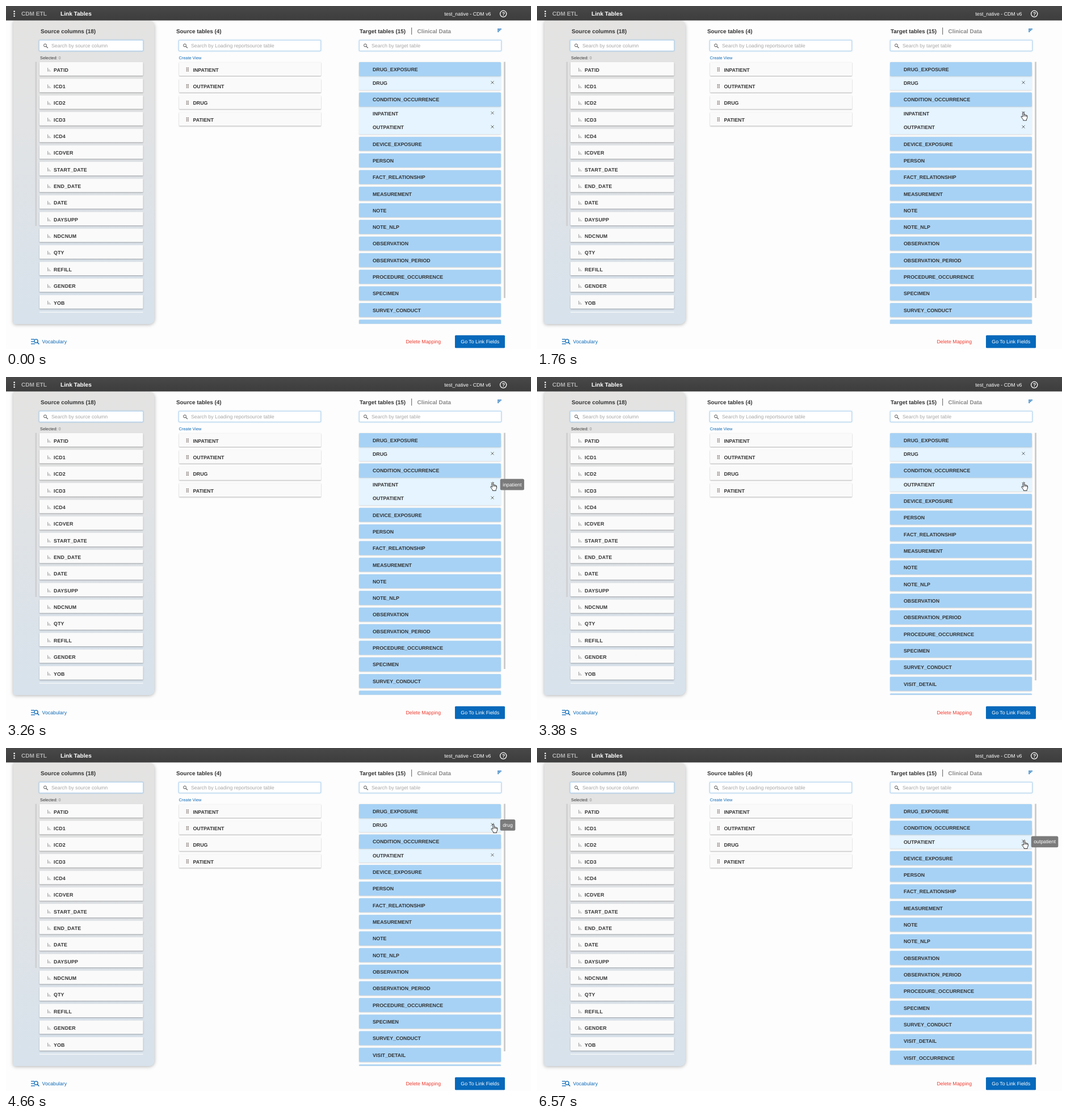
Recreate the animation shown at these times as an HTML page with a canvas. Size 925 px wide and 605 px high, loop 8 s.

```html
<!DOCTYPE html>
<html lang="en">
<head>
<meta charset="utf-8">
<title>Link Tables</title>
<style>
html, body { margin: 0; width: 100%; height: 100%; overflow: hidden; background: #fdfdfd; }
canvas { display: block; }
</style>
</head>
<body>
<canvas id="stage" width="925" height="605"></canvas>
<script>
const ctx = document.getElementById('stage').getContext('2d');
const LOOP = 8000, PITCH = 29.35, SUB = 24.4;
const FONT = '"Liberation Sans", Arial, sans-serif';
const BLUE = '#0b69b7', INK = '#333';

const COLUMNS = ['PATID', 'ICD1', 'ICD2', 'ICD3', 'ICD4', 'ICDVER', 'START_DATE', 'END_DATE',
  'DATE', 'DAYSUPP', 'NDCNUM', 'QTY', 'REFILL', 'GENDER', 'YOB'];
const TABLES = ['INPATIENT', 'OUTPATIENT', 'DRUG', 'PATIENT'];
const CDM = ['DRUG_EXPOSURE', 'CONDITION_OCCURRENCE', 'DEVICE_EXPOSURE', 'PERSON',
  'FACT_RELATIONSHIP', 'MEASUREMENT', 'NOTE', 'NOTE_NLP', 'OBSERVATION', 'OBSERVATION_PERIOD',
  'PROCEDURE_OCCURRENCE', 'SPECIMEN', 'SURVEY_CONDUCT', 'VISIT_DETAIL', 'VISIT_OCCURRENCE'];

const UNLINK_INPATIENT = 3380, UNLINK_DRUG = 5530;

// time, x, y of the pointer tip
const PATH = [
  [350, 918, 600], [600, 868, 540], [900, 828, 458], [1020, 820, 350], [1140, 841, 222],
  [1320, 852, 202], [1560, 857, 188], [1900, 857, 186], [2020, 857, 187], [2200, 850, 208],
  [2380, 859.5, 190], [2630, 859, 187], [2710, 859, 187], [2770, 857.7, 185],
  [3680, 857.7, 185], [3820, 860, 193], [4000, 862.5, 184], [4220, 876, 157],
  [4480, 859, 134], [5920, 859, 134], [6200, 869, 147], [6440, 859, 163],
  [6570, 858.5, 162], [8000, 858.5, 162]
];

// start, end, label, middle line
const TIPS = [
  [1820, 2080, 'inpatient', 189.8], [3140, UNLINK_INPATIENT, 'inpatient', 189.8],
  [3430, 3740, 'outpatient', 189.8], [4530, UNLINK_DRUG, 'drug', 136],
  [6455, 9000, 'outpatient', 165.4]
];

const clamp = v => Math.max(0, Math.min(1, v));

function text(str, x, y, size, color, weight = 400, spacing = 0) {
  ctx.font = `${weight} ${size}px ${FONT}`;
  ctx.letterSpacing = spacing + 'px';
  ctx.fillStyle = color;
  ctx.fillText(str, x, y);
}

function rect(x, y, w, h, color) {
  ctx.fillStyle = color;
  ctx.fillRect(x, y, w, h);
}

function round(x, y, w, h, r, color) {
  ctx.fillStyle = color;
  ctx.beginPath();
  ctx.roundRect(x, y, w, h, r);
  ctx.fill();
}

function line(color, width, ...pts) {
  ctx.strokeStyle = color;
  ctx.lineWidth = width;
  ctx.beginPath();
  for (let i = 0; i < pts.length; i += 4) {
    ctx.moveTo(pts[i], pts[i + 1]);
    ctx.lineTo(pts[i + 2], pts[i + 3]);
  }
  ctx.stroke();
}

function ring(x, y, r, color, width) {
  ctx.strokeStyle = color;
  ctx.lineWidth = width;
  ctx.beginPath();
  ctx.arc(x, y, r, 0, Math.PI * 2);
  ctx.stroke();
}

function withShadow(color, blur, dy, draw) {
  ctx.save();
  ctx.shadowColor = color;
  ctx.shadowBlur = blur;
  ctx.shadowOffsetY = dy;
  draw();
  ctx.restore();
}

function searchBox(x, w, hint) {
  withShadow('rgba(70,150,220,.45)', 3, 0, () => round(x, 60, w, 19.5, 1.5, '#a6cdec'));
  round(x + .8, 60.8, w - 1.6, 17.9, 1, '#fff');
  ring(x + 11, 69.4, 2.5, '#555', 1);
  line('#555', 1.2, x + 12.9, 71.3, x + 15.8, 74.2);
  text(hint, x + 22, 73, 8.8, '#a5a5a5');
}

function card(x, y, w, h) {
  withShadow('rgba(0,0,0,.3)', 2, 1, () => round(x, y, w, h, 1, '#fafafa'));
}

function topBar() {
  const g = ctx.createLinearGradient(0, 0, 0, 25.5);
  g.addColorStop(0, '#484848');
  g.addColorStop(1, '#3d3d3d');
  rect(0, 0, 925, 25.5, g);
  for (const y of [9.6, 13.7, 17.8]) round(13.3, y - 1.3, 2.6, 2.6, 1.3, '#fff');
  text('CDM ETL', 27, 17.4, 10.1, '#b2b2b2', 700);
  text('Link Tables', 96, 17.4, 10.1, '#fff', 700);
  text('test_native - CDM v6', 772.3, 16.6, 8.8, '#fff');
  ring(876.2, 13.8, 5.6, '#fff', 1.3);
  text('?', 873.7, 17.2, 9, '#fff', 700);
}

function columnPanel() {
  const g = ctx.createLinearGradient(0, 26, 0, 561);
  g.addColorStop(0, '#e4e3e2');
  g.addColorStop(.3, '#e2e3e4');
  g.addColorStop(1, '#d7e2ec');
  withShadow('rgba(0,0,0,.3)', 6, 1, () => round(13, 26, 248.5, 535, [0, 10, 9, 4], g));
  text('Source columns (18)', 61, 47.5, 9.9, INK, 700);
  searchBox(58, 184, 'Search by source column');
  text('Selected:', 60, 93.7, 7.33, INK);
  text('0', 92.6, 93.7, 7.33, '#888');
  rect(51.5, 98.5, 2.7, 289.5, '#cfcfcf');
  COLUMNS.forEach((name, i) => {
    const y = 99 + PITCH * i;
    card(59, y, 182.5, 23.8);
    line('#999', 1, 73.6, y + 10, 73.6, y + 16.6, 75.8, y + 12.5, 75.8, y + 16.6,
      78, y + 14.8, 78, y + 16.6);
    text(name, 84, y + 16.6, 8.8, INK, 700, .2);
  });
  rect(59, 539.3, 182.5, 1.5, '#f6f8fa');
}

function tableList() {
  text('Source tables (4)', 300, 47.5, 9.9, INK, 700);
  searchBox(304, 251, 'Search by Loading reportsource table');
  text('Create View', 304.5, 93.7, 7.33, BLUE);
  TABLES.forEach((name, i) => {
    const y = 99.3 + PITCH * i;
    card(305, y, 250, 23.8);
    for (let k = 0; k < 6; k++)
      rect(317.7 + (k % 2) * 2.6, y + 9.3 + (k >> 1) * 2.6, 1.5, 1.5, '#6a5c58');
    text(name, 329.5, y + 16.3, 8.8, INK, 700);
  });
}

function linksOf(name, t) {
  if (name === CDM[0]) return t < UNLINK_DRUG ? ['DRUG'] : [];
  if (name === CDM[1]) return t < UNLINK_INPATIENT ? ['INPATIENT', 'OUTPATIENT'] : ['OUTPATIENT'];
  return [];
}

// Draws the right-hand list and returns the middle lines of the linked rows.
function cdmList(t) {
  text('Target tables (15)', 623, 47.5, 9.9, INK, 700);
  rect(714, 38, 1.2, 12.5, '#777');
  text('Clinical Data', 724.5, 47.5, 9.95, '#8a8a8a', 700);
  [7, 5, 2.6].forEach((w, i) => rect(866, 40 + i * 2.3, w, 1.3, BLUE));
  searchBox(622, 251, 'Search by target table');

  const linked = [];
  let y = 111.4;
  ctx.save();
  ctx.beginPath();
  ctx.rect(618, 95, 258, 465.5);
  ctx.clip();
  for (const name of CDM) {
    const links = linksOf(name, t);
    if (links.length)
      withShadow('rgba(0,0,0,.15)', 2, 1, () =>
        round(622, y, 250, 12.4 + SUB * links.length, 1.5, '#e5f4ff'));
    withShadow('rgba(0,0,0,.2)', 2, .7, () => round(622, y - 12.5, 250, 24.6, 1.5, '#a7d2f5'));
    text(name, 646, y + 3.3, 8.8, INK, 700);
    for (const link of links) {
      y += SUB;
      linked.push(y);
      text(link, 646, y + 3.4, 8.8, INK, 700);
      const m = y - .9, r = 2.5;
      line('#555', .9, 857 - r, m - r, 857 + r, m + r, 857 - r, m + r, 857 + r, m - r);
    }
    y += 29.32;
  }
  ctx.restore();
  const end = t < UNLINK_INPATIENT ? 515 : t < UNLINK_DRUG ? 535 : 558;
  rect(877, 98.5, 3, end - 98.5, '#cdcdcd');
  return linked;
}

function footer() {
  line(BLUE, 1.3, 44, 587.8, 50, 587.8, 44, 591.8, 49, 591.8, 44, 595.8, 51, 595.8);
  ring(53, 591, 3.1, BLUE, 1.3);
  line(BLUE, 1.5, 55.2, 593.2, 58.3, 596.5);
  text('Vocabulary', 63.5, 595.1, 8.8, BLUE);
  text('Delete Mapping', 704.5, 595.1, 8.8, '#f03a2e');
  round(791, 580.8, 88, 22.4, 1.5, '#0769bb');
  text('Go To Link Fields', 801.3, 595.1, 8.8, '#fff');
}

function tooltips(t) {
  for (const [from, to, label, mid] of TIPS) {
    if (t < from || t >= to) continue;
    ctx.globalAlpha = clamp((t - from) / 110) * clamp((to - t) / 60);
    ctx.font = `400 8.8px ${FONT}`;
    ctx.letterSpacing = '0px';
    round(870.7, mid - 10, ctx.measureText(label).width + 9, 19.8, 2.5, '#7b7b7b');
    text(label, 875.2, mid + 3, 8.8, '#fff');
    ctx.globalAlpha = 1;
  }
}

// Monotone cubic through PATH, so that rests stay still.
function pointerAt(t) {
  let i = 0;
  while (i < PATH.length - 2 && t >= PATH[i + 1][0]) i++;
  const a = PATH[i], b = PATH[i + 1], h = b[0] - a[0], u = clamp((t - a[0]) / h);
  const slope = (j, k) => j < 0 || j > PATH.length - 2 ? 0
    : (PATH[j + 1][k] - PATH[j][k]) / (PATH[j + 1][0] - PATH[j][0]);
  const tangent = (j, k) => {
    const p = slope(j - 1, k), q = slope(j, k);
    return p * q > 0 ? 2 * p * q / (p + q) : 0;
  };
  return [1, 2].map(k => {
    const ease = u * u * (3 - 2 * u);
    return a[k] + (b[k] - a[k]) * ease
      + h * u * (1 - u) * ((1 - u) * tangent(i, k) - u * tangent(i + 1, k));
  });
}

const ARROW = new Path2D('M0 0V11.2L2.6 8.8 4.3 12.6 6 11.9 4.4 8.1H7.9Z');
const HAND = new Path2D('M-1.1 9.4V1.3Q0 -.4 1.1 1.3V5.4Q2.6 4.6 3.3 5.9Q4.7 5.2 5.4 6.5' +
  'Q6.7 6.2 6.8 7.8V11L5.5 13.6V15.5H-.4V14L-3.8 9.6Q-4.3 7.6 -2.7 8Z');
const KNUCKLES = new Path2D('M1.1 5.4V8.4M3.3 5.9V8.6M5.4 6.5V8.8');

function pointer(t, linked) {
  if (t < PATH[0][0]) return;
  const [x, y] = pointerAt(t);
  const hand = x > 848.5 && x < 868 && linked.some(m => Math.abs(m - y) < SUB / 2);
  const shape = hand ? HAND : ARROW;
  ctx.save();
  ctx.translate(x, y);
  ctx.lineJoin = 'round';
  ctx.lineWidth = .9;
  ctx.fillStyle = '#fff';
  ctx.strokeStyle = '#222';
  ctx.fill(shape);
  ctx.stroke(shape);
  if (hand) ctx.stroke(KNUCKLES);
  ctx.restore();
}

function frame(now) {
  const t = now % LOOP;
  ctx.textRendering = 'geometricPrecision';
  rect(0, 0, 925, 605, '#fdfdfd');
  columnPanel();
  topBar();
  tableList();
  const linked = cdmList(t);
  footer();
  tooltips(t);
  pointer(t, linked);
}

const start = performance.now();
function tick() {
  frame(performance.now() - start);
  requestAnimationFrame(tick);
}
tick();
</script>
</body>
</html>
```
